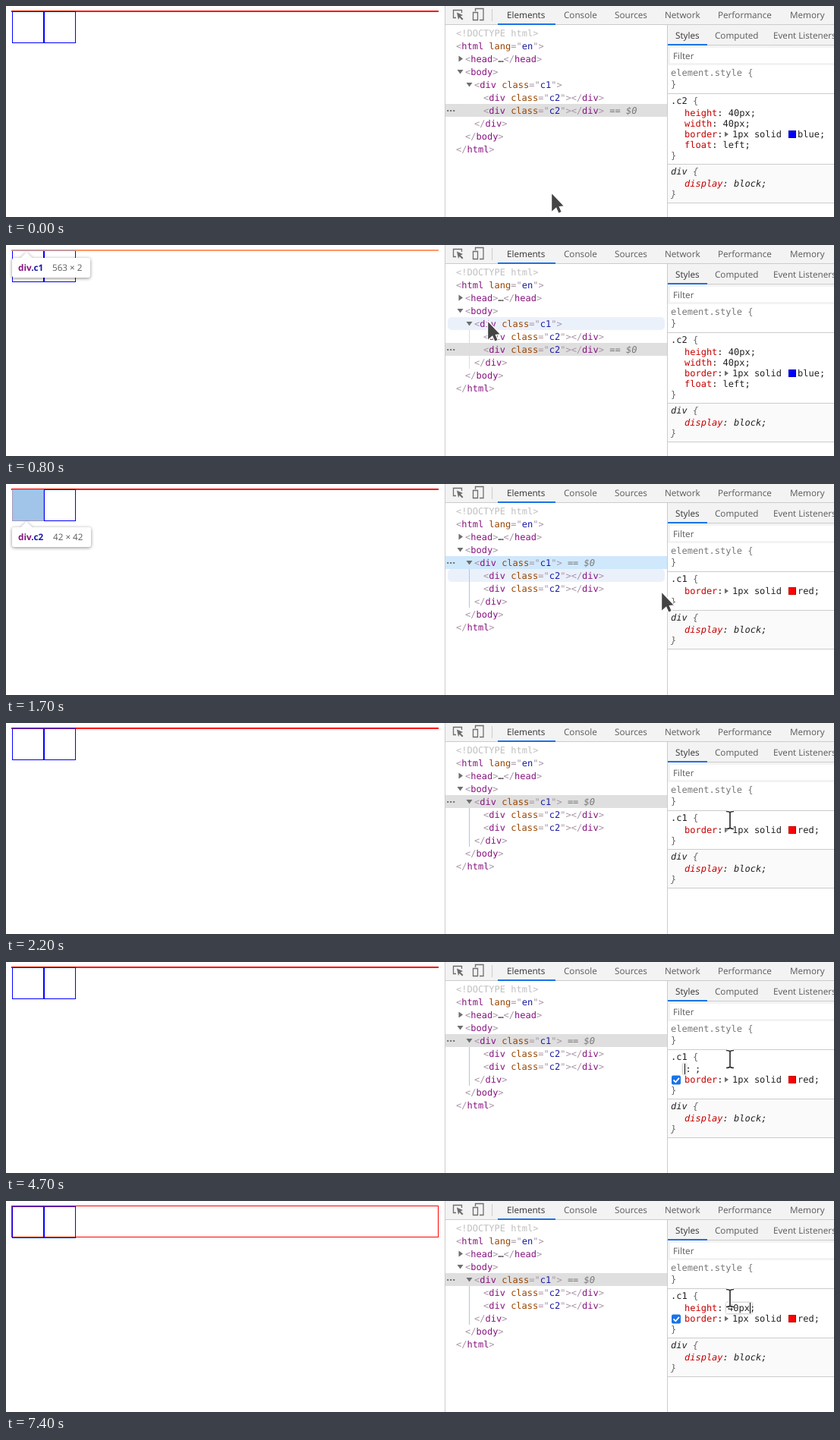
Recreate the animation shown at these times as an HTML page. Size 1091 px wide and 278 px high, loop 8000 ms.

```html
<!DOCTYPE html>
<html lang="en">
<head>
<meta charset="utf-8">
<title>Inspector</title>
<style>
html, body { margin: 0; width: 100%; height: 100%; overflow: hidden; background: #fff; }
svg { display: block; }
text { white-space: pre; text-rendering: geometricPrecision; font: 12px "DejaVu Sans Mono", monospace; fill: #222; }
.ui { font: 11.7px "Open Sans", "Noto Sans", sans-serif; fill: #5a5a5a; }
.on { fill: #333; }
.b { font-weight: bold; }
.i { font-style: italic; }
.tip { filter: drop-shadow(0 1px 2px rgba(0,0,0,.45)); }
.pop { filter: drop-shadow(0 1px 2px rgba(0,0,0,.4)); }
.edit { filter: drop-shadow(0 0 1.5px rgba(0,0,0,.4)); }
</style>
</head>
<body>
<svg id="stage" width="1091" height="278" viewBox="0 0 1091 278"></svg>
<script>
const LOOP = 8000, CH = 7.224;
const PUNCT = '#a894a6', TAG = '#881280', ATTR = '#994500', VAL = '#1a1aa6', PROP = '#c80000', BLUE = '#1a73e8';

const esc = s => s.replace(/&/g, '&amp;').replace(/</g, '&lt;');
const rect = (x, y, w, h, fill, more = '') => `<rect x="${x}" y="${y}" width="${w}" height="${h}" fill="${fill}" ${more}/>`;
const frame = (x, y, w, h, color) => rect(x + .5, y + .5, w - 1, h - 1, 'none', `stroke="${color}"`);
const path = (d, fill, more = '') => `<path d="${d}" fill="${fill}" ${more}/>`;
const span = (s, fill) => `<tspan fill="${fill}">${esc(s)}</tspan>`;
const text = (x, y, body, cls = '') => `<text x="${x}" y="${y}" class="${cls}">${body}</text>`;
const group = (cls, body) => `<g class="${cls}">${body}</g>`;

// Latest value whose start time has passed
const pick = (t, steps) => steps.filter(s => s[0] <= t).pop()[1];

const MOVES = [[0, 718, 245], [200, 780, 270], [300, 800, 300], [400, 800, 300], [500, 762, 244],
  [800, 634, 99], [1200, 655, 102], [1400, 655, 102], [1700, 863, 141], [1800, 900, 150], [2200, 953, 128]];
const HOVER = [[0, -1], [600, 9], [700, 7], [800, 4], [1500, 5], [1800, -1]];
const CARET = [[0, 0], [2400, 1], [2900, 0], [3400, 1], [4100, 0], [4700, 1], [6400, 0], [7000, 1]];
const NAME = [[0, ''], [3400, 'e'], [3800, ''], [4900, 'h'], [5000, 'he'], [5100, 'hei']];
const VALUE = [[0, ''], [7000, '4'], [7100, '40'], [7300, '40p'], [7400, '40px']];
const HINTS = {
  e: ['empty-cells', 'empty-cells: hide', 'empty-cells: show', 'align-content', 'align-items', 'align-self', 'animation-delay'],
  h: ['height', 'hyphens', 'hyphens: auto', 'hyphens: manual', 'hyphens: none', 'line-height', 'max-height'],
  he: ['height', 'line-height', 'max-height', 'min-height', 'hyphens', 'hyphens: auto', 'hyphens: manual'],
  hei: ['height', 'line-height', 'max-height', 'min-height', 'text-height', 'shape-margin', 'white-space']
};
const SIZES = ['auto', 'fit-content', 'inherit', 'initial', 'max-content', 'min-content', 'revert'];

function pointer(t) {
  const i = MOVES.findIndex(m => m[0] > t);
  if (i < 0) return MOVES[MOVES.length - 1].slice(1);
  const [a, b] = [MOVES[i - 1], MOVES[i]], k = (t - a[0]) / (b[0] - a[0]);
  return [a[1] + (b[1] - a[1]) * k, a[2] + (b[2] - a[2]) * k];
}

function cursor(t) {
  const [x, y] = pointer(t).map(Math.round);
  if (t < 1900) return `<g transform="translate(${x + .5} ${y + .5})">` +
    path('M0 0V26.5L6.3 20.8 9.5 28 14 26 11 19 17.5 18.5Z', '#444', 'stroke="#fff" stroke-width="1.4"') + '</g>';
  const d = `M${x - 4} ${y - 11.5}q4 0 5 1.5q1 -1.5 5 -1.5M${x + 1} ${y - 10}v20M${x - 4} ${y + 11.5}q4 0 5 -1.5q1 1.5 5 1.5`;
  return path(d, 'none', 'stroke="#fff" stroke-width="4" opacity=".9"') + path(d, 'none', 'stroke="#333" stroke-width="1.7"');
}

function tooltip(y, tag, cls, size, w) {
  return group('tip', rect(8, y, w, 26, '#fff', 'rx="3"') + path(`M19 ${y + .5}l8 -8 8 8z`, '#fff')) +
    text(16, y + 17, span(tag, TAG) + span(cls, VAL), 'ui b') + text(w - 49 + (cls ? 7 : 0), y + 17, size, 'ui');
}

function page(t, hover) {
  const tall = t >= 7400;
  let out = frame(7, 6, 563, tall ? 42 : 2, 'red') + frame(8, 7, 42, 42, '#00f') + frame(50, 7, 42, 42, '#00f');
  const edge = 'rgba(255,229,153,.66)', fill = 'rgba(111,168,220,.66)';
  if (hover == 9) out += rect(0, 0, 578, 16, fill) + tooltip(24, 'html', '', '578 × 16', 104);
  if (hover == 4 || hover == 7) out += rect(7, 6, 563, 2, edge) + tooltip(17, 'div', '.c1', '563 × 2', 103);
  if (hover == 5) out += frame(8, 7, 42, 42, edge) + rect(9, 8, 40, 40, fill) + tooltip(57, 'div', '.c2', '42 × 42', 104);
  return out;
}

const open = (name, attr, value) => span('<', PUNCT) + span(name, TAG) +
  (attr ? span(' ' + attr, ATTR) + span('="', PUNCT) + span(value, VAL) + span('"', PUNCT) : '') + span('>', PUNCT);
const close = name => span('</', PUNCT) + span(name, TAG) + span('>', PUNCT);
const ROWS = [
  [593, span('<!DOCTYPE html>', '#c0c0c0')],
  [593, open('html', 'lang', 'en')],
  [605, open('head') + '…' + close('head')],
  [605, open('body')],
  [617, open('div', 'class', 'c1')],
  [629, open('div', 'class', 'c2') + close('div')],
  [629, open('div', 'class', 'c2') + close('div')],
  [617, close('div')],
  [605, close('body')],
  [593, close('html')]
];

function tree(t, hover) {
  const picked = t < 1400 ? 6 : 4, top = 27 + 17 * picked;
  let out = rect(579, top, 292, 17, t >= 1400 && t < 2200 ? '#cfe8fc' : '#dfdfdf');
  if (hover >= 0 && hover != picked) out += rect(582, 27 + 17 * hover, 286, 17, '#ebf1fb', 'rx="5"');
  if (picked == 4) out += rect(610, 112, 1, 51, '#a8c7f0');
  else if (hover == 4 || hover == 7) out += rect(610, 112, 1, 51, '#ddd');
  for (const x of [581, 585, 589]) out += rect(x, top + 8, 2.4, 2, '#666', 'rx="1"');
  ROWS.forEach(([x, body], i) => {
    const mark = i == picked ? ' <tspan class="i" fill="#777">== $0</tspan>' : '';
    out += text(x, 40 + 17 * i, body + mark);
  });
  return out + path('M596.5 65.5v8l5.500 -4z', '#6e6e6e') +
    path('M594.500 84h8l-4 5.500z', '#6e6e6e') + path('M606.500 101h8l-4 5.500z', '#6e6e6e');
}

function declaration(y, [name, value, color], cls) {
  let out = text(894, y, span(name, PROP) + ':' + (color ? '' : ` ${value};`), cls);
  if (color) out += path(`M947 ${y - 7.500}v7l5 -3.500z`, '#6e6e6e') + text(957, y, value) +
    rect(1031, y - 9, 10, 10, color) + frame(1031, y - 9, 10, 10, 'rgba(0,0,0,.25)') + text(1043, y, color + ';');
  return out;
}

// Draws one style rule below the line at y; returns its markup and the next line
function rule(y, title, props, cls = '') {
  const end = y + 51 + 14 * (props.length - 1);
  let out = (cls ? rect(872, y + 1, 219, end - y, '#fafafa') : '') + text(876, y + 14, title + span(' {', '#666'), cls);
  props.forEach((p, i) => { if (p) out += declaration(y + 30 + 14 * i, p, cls); });
  return [out + text(876, end - 7, span('}', '#666'), cls) + rect(872, end, 219, 1, '#ccc'), end];
}

function popup(x, items, query) {
  let out = group('pop', rect(x, 151, 220, 140, '#fff', 'stroke="#bbb" stroke-width=".7"'));
  items.forEach((item, i) => {
    const lit = query && i == 0;
    let k = 0;
    const body = [...item].map(c => c === query[k] ? (k++, `<tspan class="b">${c}</tspan>`) : c).join('');
    if (lit) out += rect(x + .5, 151, 220, 18, BLUE);
    out += text(x + 3, 164 + 18 * i, lit ? `<tspan fill="#fff">${body}</tspan>` : body);
  });
  return out;
}

const field = (x, w) => group('edit', rect(x, 134, w, 14, '#fff'));
const caret = (t, x) => pick(t, CARET) ? rect(Math.round(x), 134, 1, 14, '#000') : '';

function nameEditor(t) {
  const typed = pick(t, NAME), listed = typed && t >= 3500;
  const ghost = listed ? HINTS[typed][0].slice(typed.length) : '';
  const w = (typed + ghost).length * CH, x = 894 + w;
  return field(892, w + 4) + text(894, 145, typed + span(ghost, '#808080')) +
    text(x + 1.500, 145, ':') + text(x + 14, 145, ';') + caret(t, 894 + typed.length * CH) +
    (listed ? popup(890, HINTS[typed], typed) : '');
}

function valueEditor(t) {
  const typed = pick(t, VALUE), w = typed.length * CH;
  return text(894, 145, span('height', PROP) + ':') + field(949, w + 5) + text(951, 145, typed) +
    text(951 + w, 145, ';') + caret(t, 951 + w) + (typed ? '' : popup(947, SIZES, ''));
}

function styles(t) {
  const border = color => ['border', '1px solid', color], editing = t >= 2400;
  const props = t < 1400 ? [['height', '40px'], ['width', '40px'], border('blue'), ['float', 'left']]
    : editing ? [null, border('red')] : [border('red')];
  const [own, y] = rule(115, t < 1400 ? '.c2' : '.c1', props);
  let out = text(876, 92, span('element.style {', '#777')) + text(876, 107, span('}', '#666')) +
    rect(872, 115, 219, 1, '#ccc') + own + rule(y, 'div', [['display', 'block']], 'i')[0];
  if (editing) out += rect(877, 149.500, 12, 12, BLUE, 'rx="2"') +
    path('M879.500 155.500l2.800 2.800 4.700 -5.500', 'none', 'stroke="#fff" stroke-width="1.8"') +
    (t < 5800 ? nameEditor(t) : valueEditor(t));
  return out;
}

function chrome() {
  const tabs = (y, list) => list.map(([x, s], i) => text(x, y, s, i ? 'ui' : 'ui on')).join('');
  const line = 'stroke="#6e6e6e" stroke-width="1.3"';
  return rect(578, 0, 513, 278, '#fff') + rect(578, 0, 513, 24, '#f3f3f3') + rect(578, 24, 513, 1, '#ccc') +
    rect(872, 25, 219, 53, '#f3f3f3') + rect(872, 51, 219, 1, '#ccc') + rect(875, 55, 216, 20, '#fff') +
    rect(578, 0, 1, 278, '#ccc') + rect(871, 25, 1, 253, '#ccc') + rect(640, 4, 1, 16, '#ccc') +
    rect(648, 23, 76, 2, BLUE) + rect(872, 50, 52, 2, BLUE) +
    path('M593 15.500h-3.500v-10h11v3.500', 'none', line) + path('M594 8.500l8 3.500 -3 1.500 3.500 3.500 -1.500 1.500 -3.500 -3.500 -1.500 3z', '#6e6e6e') +
    path('M618.500 7v-3.500h10.500v15h-5M615.500 8.500h6v10h-6z', 'none', line) +
    tabs(16, [[660, 'Elements'], [735, 'Console'], [802, 'Sources'], [868, 'Network'], [938, 'Performance'], [1033, 'Memory']]) +
    tabs(43, [[882, 'Styles'], [934, 'Computed'], [1011, 'Event Listeners']]) + text(879, 70, 'Filter', 'ui');
}

const stage = document.getElementById('stage');
let shown = -1;
function draw(now) {
  const t = Math.floor(now % LOOP / 100) * 100;
  if (t !== shown) {
    shown = t;
    const hover = pick(t, HOVER);
    stage.innerHTML = page(t, hover) + chrome() + tree(t, hover) + styles(t) + cursor(t);
  }
  requestAnimationFrame(() => draw(performance.now()));
}
draw(performance.now());
</script>
</body>
</html>
```
